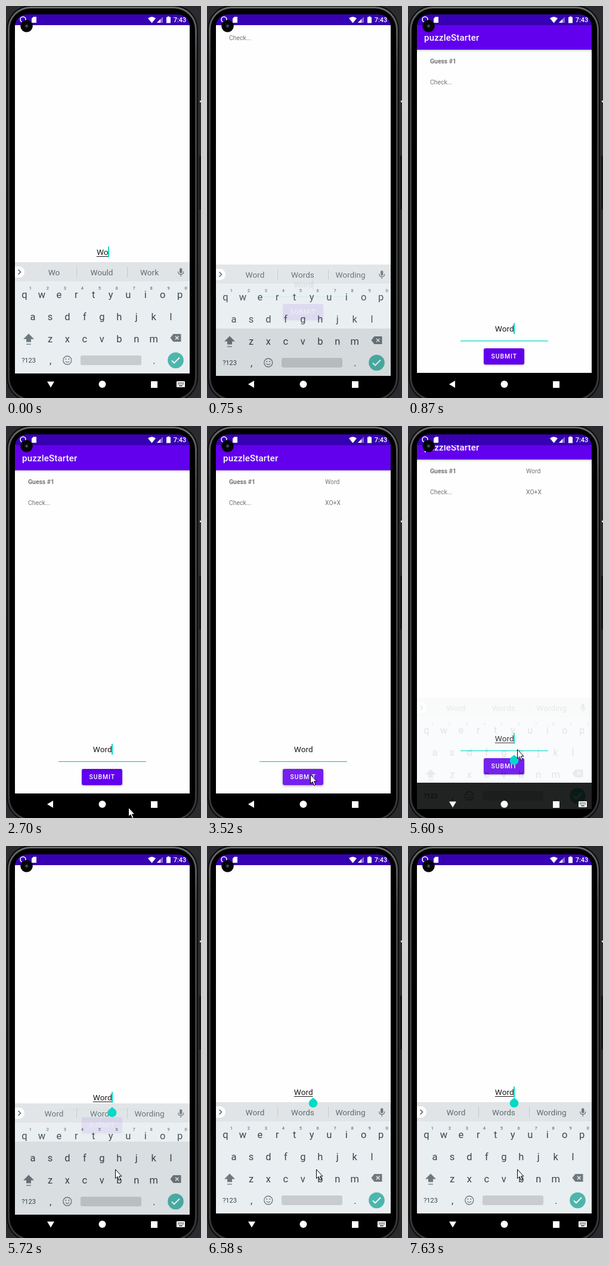
Animation of 327x655 px, one loop 8 s. Source, as an HTML page with a canvas:

```html
<!DOCTYPE html>
<html lang="en">
<head>
<meta charset="utf-8">
<style>
html, body { margin: 0; width: 327px; height: 655px; overflow: hidden; background: #2a2b2e; }
canvas { display: block; }
</style>
</head>
<body>
<canvas id="stage" width="327" height="655"></canvas>
<script>
const LOOP = 8000, CLOSE = 750, SUBMIT = 3260, TAP = 5480, OPEN = 5600;
const SHIFT = 129, SLIDE = 180, BLINK = 485, TEAL = '#03dac5', PURPLE = '#6200ee';
const SUGGESTIONS = {
  Wo: ['Wo', 'Would', 'Work'],
  Wor: ['Wor', 'Work', 'World'],
  Word: ['Word', 'Words', 'Wording']
};
const PATH = [ // time, x, y of the pointer
  [2700, 205, 637], [3080, 165, 578], [SUBMIT, 173, 582], [4520, 173, 582], [TAP, 183, 540]
];
const stage = document.getElementById('stage').getContext('2d');
const layer = document.createElement('canvas');
layer.width = 327;
layer.height = 655;
const keyboardLayer = layer.getContext('2d');
let g = stage;

const clamp = u => Math.min(1, Math.max(0, u));
const easeOut = u => 1 - (1 - clamp(u)) ** 2;
const hold = ms => Math.floor(ms / 120) * 120;

function rect(x, y, w, h, color, r = 0) {
  g.fillStyle = color;
  g.beginPath();
  g.roundRect(x, y, w, h, r);
  g.fill();
}
function circle(x, y, r, color) {
  g.fillStyle = color;
  g.beginPath();
  g.arc(x, y, r, 0, 7);
  g.fill();
}
function shape(d, color, x = 0, y = 0, lineWidth = 0) {
  g.save();
  g.translate(x, y);
  g.fillStyle = g.strokeStyle = color;
  g.lineWidth = lineWidth;
  const path = new Path2D(d);
  lineWidth ? g.stroke(path) : g.fill(path);
  g.restore();
}
// y is the middle of the capital letters.
function text(s, x, y, size, color, align = 'center', weight = 400, spacing = 0) {
  g.font = `${weight} ${size}px Roboto, sans-serif`;
  g.letterSpacing = spacing + 'px';
  g.textAlign = align;
  g.fillStyle = color;
  g.fillText(s, x, y + size * .356);
}
function shadow(alpha, blur, dy) {
  g.shadowColor = `rgba(0,0,0,${alpha})`;
  g.shadowBlur = blur;
  g.shadowOffsetY = dy;
}
function clipped(x, y, w, h, r, paint) {
  g.save();
  g.beginPath();
  g.roundRect(x, y, w, h, r);
  g.clip();
  paint();
  g.restore();
}

function phone() {
  rect(0, 0, 327, 655, '#2a2b2e');
  rect(324, 250, 3, 90, '#151515', 1);
  rect(325, 158, 2, 3, '#ddd');
  rect(1, -1, 321, 662, '#0b0b0b', 40);
  const metal = g.createLinearGradient(0, 0, 0, 655);
  metal.addColorStop(0, '#6a6a6a');
  metal.addColorStop(.15, '#444');
  metal.addColorStop(1, '#383838');
  rect(3, 1, 317, 658, metal, 38);
  rect(6, 4, 311, 652, '#000', 35);
}

function statusBar() {
  rect(15, 14, 293, 18, '#3700b3');
  g.strokeStyle = '#fff';
  g.lineWidth = 1.6;
  g.beginPath();
  g.arc(28.5, 22.5, 4.5, 0, 7);
  g.stroke();
  shape('M3 0H8V10H0V3Z', '#fff', 43, 18);
  shape('M0 3Q6.5-2 13 3L6.5 11Z', '#fff', 238, 17.5);
  shape('M10 0V10H0Z', 'rgba(255,255,255,.4)', 253, 18);
  shape('M6 4V10H0Z', '#fff', 253, 18);
  shape('M0 1H2V0H5V1H7V11H0Z', '#fff', 269, 17.5);
  text('7:43', 291.5, 23, 11, '#fff', 'center', 500);
}

function camera() {
  circle(34.5, 33.5, 10.3, '#050505');
  circle(34.5, 33.5, 3, '#1d2836');
  circle(34.5, 33.5, 1.2, '#536a83');
}

function navigation(open) {
  if (open) {
    shape('M0 0H12L6 10Z', '#fff', 69, 627.5);
    rect(286, 627, 14, 10, '#fff', 1);
    for (let i = 0; i < 10; i++)
      rect(288 + i % 5 * 2.2, 629 + (i / 5 | 0) * 2.3, 1.2, 1.2, '#000');
    rect(290, 634, 6, 1.2, '#000');
  } else {
    shape('M10 0V12L0 6Z', '#fff', 69, 626);
  }
  circle(161.5, 632, 6, '#fff');
  rect(243, 627, 11, 11, '#fff');
}

function content(t, pan, word, open) {
  g.translate(0, -pan);
  rect(15, 32, 293, 582, '#fefefe');

  shadow(.28, 3, 1);
  rect(0, 32, 327, 42, PURPLE);
  shadow(0, 0, 0);
  text('puzzleStarter', 27, 53.8, 15, '#fff', 'left', 500, .2);

  const gray = '#757575';
  text('Guess #1', 37, 93.3, 10.4, gray, 'left', 700);
  text('Check...', 37, 128.6, 10.4, gray, 'left');
  if (t >= SUBMIT + 120) {
    text('Word', 198, 93.3, 10.4, gray, 'left');
    text('XO+X', 198, 128.6, 10.4, gray, 'left');
  }

  text(word, 161.7, 540.2, 13.6, '#1c1c1c');
  const width = g.measureText(word).width;
  if (open) rect(161.7 - width / 2, 547, width, 1, '#1c1c1c');
  const steadyUntil = t < TAP ? CLOSE + 5 : 5620;
  const blinks = Math.floor(Math.max(0, t - steadyUntil) / BLINK);
  if (blinks % 2 === 0) rect(Math.round(161.3 + width / 2), 531, 2, 18, TEAL);
  rect(88, 560, 147, 1.3, TEAL);

  const press = t < SUBMIT ? 0 : .24 * clamp(1 - hold(t - SUBMIT) / 480);
  shadow(.35, press ? 4 : 2.5, 1);
  rect(127, 573, 68, 27, PURPLE, 3);
  shadow(0, 0, 0);
  if (press) rect(127, 573, 68, 27, `rgba(255,255,255,${press})`, 3);
  text('SUBMIT', 139.5, 586.5, 10.4, '#fff', 'left', 500, .93);
}

function keyboard(suggestions) {
  const ink = '#37474f', gray = '#6e797f';
  const row = (keys, x, y) =>
    [...keys].forEach((c, i) => text(c, x + i * 28.95, y, 16.5, ink));

  rect(15, 428, 293, 186, '#e9eef1');
  rect(15, 428, 293, 32, '#e0e4e7');
  rect(15, 435, 16, 19, '#fff', [0, 9.5, 9.5, 0]);
  shape('M0 0L4 4L0 8', '#4f5b61', 20.5, 440.5, 1.5);
  suggestions.forEach((s, i) => text(s, 80.5 + i * 80, 445, 13.6, '#5f6b71'));
  rect(118, 436, 1, 17, '#c3c9cc');
  rect(203, 436, 1, 17, '#c3c9cc');
  rect(291, 438, 4.4, 8.5, gray, 2.2);
  shape('M0 0Q0 5 4.5 5T9 0M4.5 5V8.5', gray, 288.7, 443.5, 1.3);

  row('qwertyuiop', 31, 482);
  row('asdfghjkl', 45, 519);
  row('zxcvbnm', 74, 556);
  for (let i = 0; i < 10; i++)
    text((i + 1) % 10, 41 + i * 28.95, 471, 7.5, gray, 'center', 500);

  shape('M9 0L18 9H13V14H5V9H0Z', gray, 29, 547.5);
  rect(34, 564.5, 8, 1.3, gray);
  shape('M5 0H18V13H5L0 6.5Z', gray, 275.5, 548);
  shape('M0 0L5.5 5.5M5.5 0L0 5.5', '#e9eef1', 284, 551.8, 1.4);

  text('?123', 38, 592, 11, ink);
  text(',', 74.5, 592, 16.5, ink);
  text('.', 248.5, 592, 16.5, ink);
  shape('M7 0A7 7 0 1 0 7 14A7 7 0 1 0 7 0M3.8 8.3Q7 12.5 10.2 8.3', gray, 95.8, 585, 1.3);
  circle(100.3, 590, 1.1, gray);
  circle(105.3, 590, 1.1, gray);
  rect(125, 584, 102, 16, '#c8cccf', 3);
  circle(284.5, 592, 13.3, '#4db6ac');
  shape('M0 5L4 9L13 0', '#fff', 278, 587.5, 1.8);
}

// Content slides with the keyboard; the text handle trails one screen refresh behind.
function slide(t) {
  const opening = t >= OPEN;
  const ms = opening ? hold(t - OPEN) + 13 : t < CLOSE ? 0 : hold(t - CLOSE) + 43;
  const progress = easeOut(ms / SLIDE);
  const hidden = opening ? 1 - progress : clamp(ms / 150) ** 2;
  return {
    pan: Math.round(SHIFT * (opening ? progress : 1 - progress)),
    opacity: 1 - hidden,
    drop: Math.round(hidden * (opening ? 30 : 50)),
    handle: 550 - (opening ? SHIFT * easeOut((ms - 16) / SLIDE) : 0)
  };
}

function pointer(t) {
  const now = PATH[0][0] + hold(t - PATH[0][0]);
  const next = PATH.findIndex(p => p[0] > now);
  const [t1, x1, y1] = PATH.at(next < 0 ? -1 : next);
  const [t0, x0, y0] = PATH.at(next < 0 ? -2 : next - 1);
  const u = clamp((now - t0) / (t1 - t0));
  const x = Math.round(x0 + (x1 - x0) * u) + .5, y = Math.round(y0 + (y1 - y0) * u) + .5;
  const arrow = 'M0 0V15L3.5 12L6 18L8.5 17L6 11.3H10.5Z';
  shape(arrow, '#fff', x, y);
  shape(arrow, '#000', x, y, 1);
}

function draw(t) {
  const word = 'Word'.slice(0, 2 + Math.floor(t / 250));
  const { pan, opacity, drop, handle } = slide(t);
  const open = t < CLOSE || t >= OPEN;

  phone();
  clipped(15, 14, 293, 600, [20, 20, 0, 0], () => {
    clipped(15, 32, 293, 582, 0, () => content(t, pan, word, open));
    statusBar();
  });
  camera();
  navigation(open);

  if (opacity > 0) {
    g = keyboardLayer;
    g.clearRect(0, 0, 327, 655);
    keyboard(SUGGESTIONS[word]);
    g = stage;
    g.globalAlpha = opacity;
    g.drawImage(layer, 0, drop);
    g.globalAlpha = 1;
  }
  if (t >= TAP) shape('M0 0L5.2 4.2A7.3 7.3 0 1 1-5.2 4.2Z', TEAL, 178, handle - .5);
  if (t >= PATH[0][0]) pointer(t);
}

function tick() {
  draw(performance.now() % LOOP);
  requestAnimationFrame(tick);
}
tick();
</script>
</body>
</html>
```
